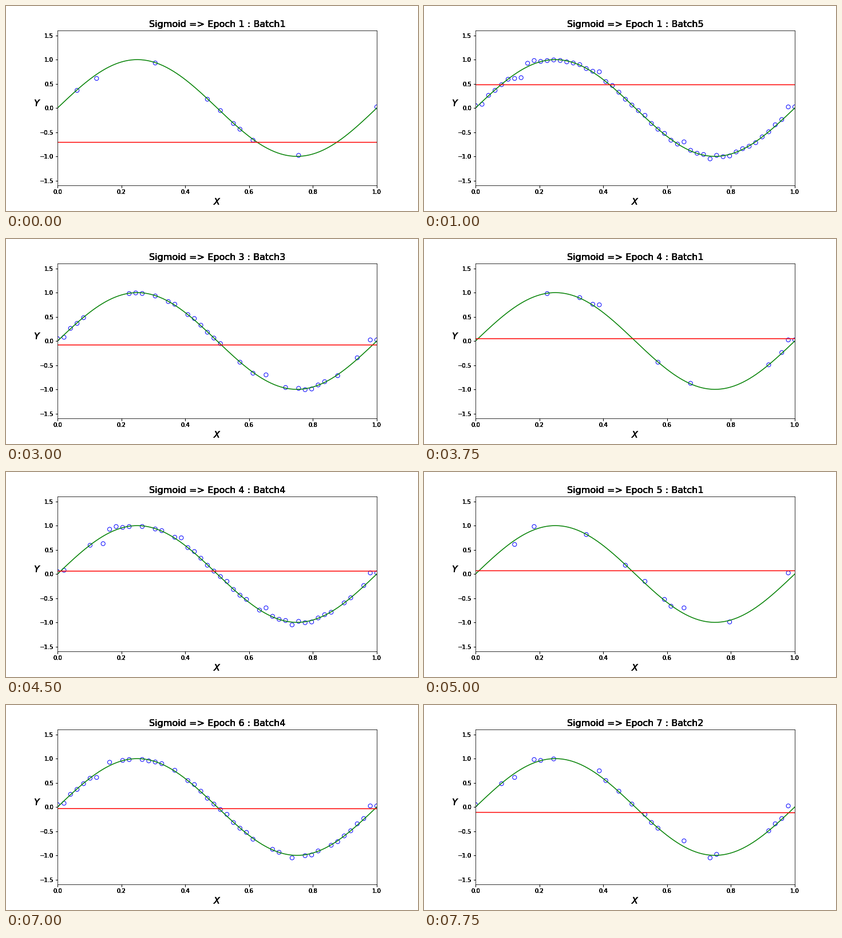
Animation, 720 px wide and 360 px high, one loop 8000 ms. Source, as a matplotlib script:

```python
import numpy as np
import matplotlib.pyplot as plt
from matplotlib.animation import FuncAnimation

FRAMES, INTERVAL = 32, 250
SAMPLES, BATCHES, BATCH_SIZE = 50, 5, 10
TEXT_LAYERS = 6

plt.rcParams["font.family"] = "DejaVu Sans"


def wave(x):
    return np.sin(2 * np.pi * x)


# Noisy samples of one sine period, with a few clear outliers
noise = np.random.default_rng(3).normal(0, .02, SAMPLES)
outliers = {0: .05, 6: -.085, 7: -.155, 8: .07, 19: .1, 32: .12, 48: .15}
noise[list(outliers)] = list(outliers.values())
x_train = np.linspace(0, 1, SAMPLES)
y_train = wave(x_train) + noise
x_curve = np.linspace(0, 1, 200)


def seen_samples(epoch, batch):
    """Every epoch reshuffles the samples and reveals them batch by batch."""
    order = np.random.default_rng(epoch).permutation(SAMPLES)
    return order[:batch * BATCH_SIZE]


def prediction(step):
    """A nearly flat fit that swings around zero and settles, then tilts."""
    level = np.interp(step, [0, 4, 9, 15, 20, 24, 31],
                      [-.71, .48, -.212, .047, .067, .074, -.115])
    slope = np.interp(step, [24, 31], [0, -.008])
    return level + slope * (x_curve - .5)


fig = plt.figure(figsize=(10, 5), dpi=72, facecolor="white")


def make_axes():
    ax = fig.add_axes([.125, .125, .775, .755])
    ax.set(xlim=(0, 1), ylim=(-1.6, 1.6))
    ax.patch.set_visible(False)
    ax.spines[:].set_visible(False)
    ax.tick_params(labelsize=10)
    ax.set_xlabel("$X$", fontsize=16)
    ax.set_ylabel("$Y$", fontsize=16, rotation=0)
    return ax


# Stacked axes give the lettering its hard, heavy edge
layers = [make_axes() for _ in range(TEXT_LAYERS)]
titles = [layer.set_title("", fontsize=16) for layer in layers]
ax = layers[-1]
ax.spines[:].set_visible(True)

points = ax.scatter([], [], s=50, facecolor="none", edgecolor="b", linewidth=1)
ax.plot(x_curve, wave(x_curve), "g", lw=1.5)
fit, = ax.plot([], [], "r", lw=1.5, snap=False)


def update(step):
    epoch, batch = step // BATCHES + 1, step % BATCHES + 1
    seen = seen_samples(epoch, batch)
    points.set_offsets(np.column_stack([x_train[seen], y_train[seen]]))
    fit.set_data(x_curve, prediction(step))
    for title in titles:
        title.set_text(f"Sigmoid => Epoch {epoch} : Batch{batch}")
    return [points, fit, *titles]


anim = FuncAnimation(fig, update, frames=FRAMES, interval=INTERVAL,
                     repeat=True, repeat_delay=0)
plt.show()
```
